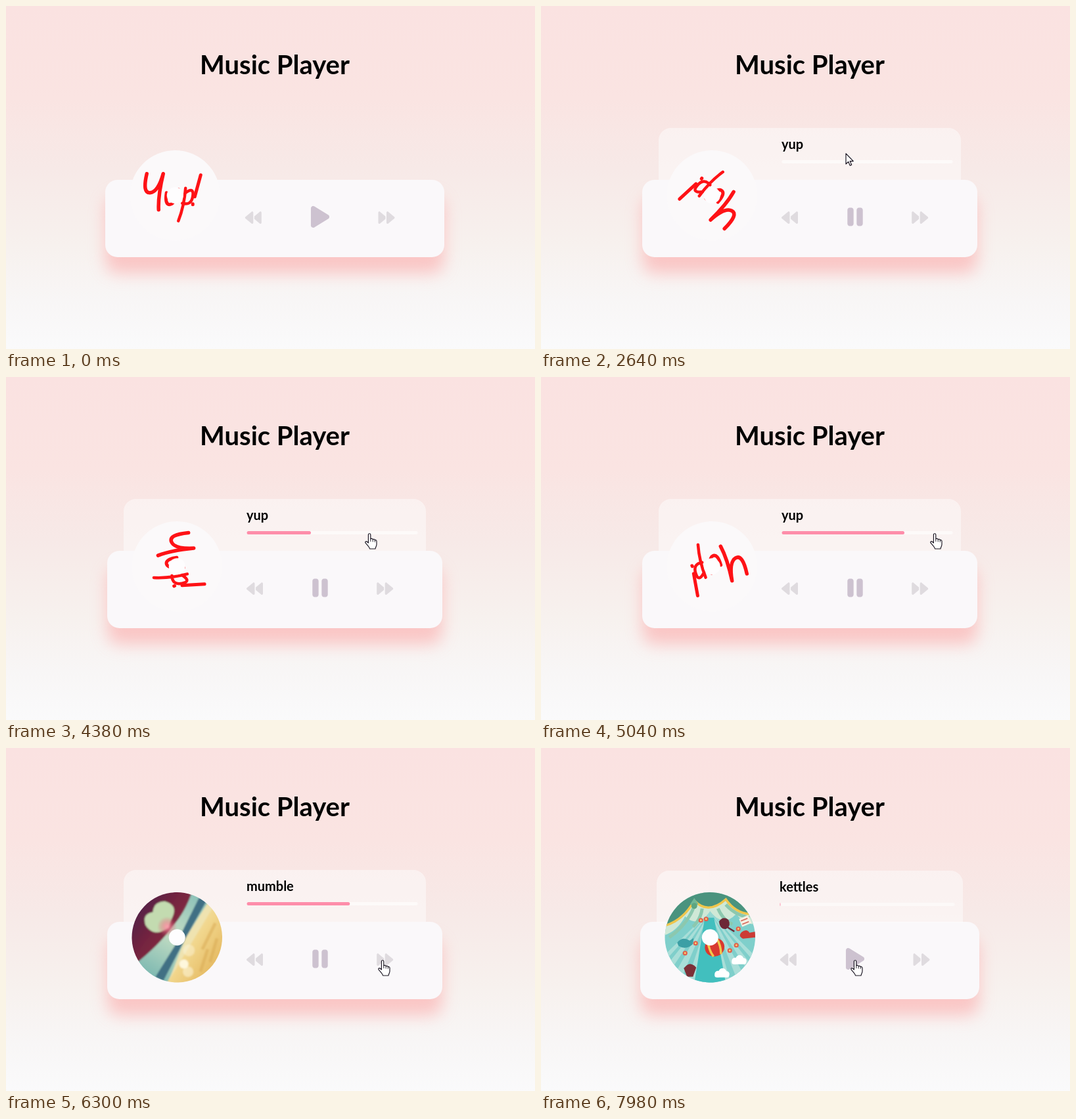
Write an HTML page that moves like this. It is 805 by 523 pixels and loops after 8000 ms.

```html
<!DOCTYPE html>
<html lang="en">
<head>
<meta charset="utf-8">
<title>Music Player</title>
<style>
  html, body { margin: 0; width: 100%; height: 100%; overflow: hidden; background: #fafafb; }
  svg { display: block; width: 805px; height: 523px; }
  text { font-family: Lato, sans-serif; font-weight: 700; fill: #000; }
</style>
</head>
<body>
<svg viewBox="0 0 805 523" xmlns="http://www.w3.org/2000/svg">
  <defs>
    <linearGradient id="sky" x2="0" y2="1">
      <stop offset="0" stop-color="#fae2e1"/>
      <stop offset=".27" stop-color="#fae4e2"/>
      <stop offset=".47" stop-color="#f7e9e7"/>
      <stop offset=".7" stop-color="#f7f1ee"/>
      <stop offset=".86" stop-color="#f8f6f6"/>
      <stop offset="1" stop-color="#fafafb"/>
    </linearGradient>
    <linearGradient id="sand" x1="0" y1=".8" x2=".6" y2=".3">
      <stop offset="0" stop-color="#e2b256"/>
      <stop offset=".5" stop-color="#f1d68c"/>
      <stop offset="1" stop-color="#f7f0cc"/>
    </linearGradient>
    <linearGradient id="dusk" x1="0" y1="1" x2="1" y2="0">
      <stop offset="0" stop-color="#a23a4c"/>
      <stop offset=".55" stop-color="#73243f"/>
      <stop offset="1" stop-color="#35204f"/>
    </linearGradient>
    <linearGradient id="sea" x2="1" y2="1">
      <stop offset="0" stop-color="#58a5a8"/>
      <stop offset=".5" stop-color="#c3ddc3"/>
      <stop offset="1" stop-color="#6fb3b3"/>
    </linearGradient>
    <radialGradient id="flare">
      <stop offset="0" stop-color="#ff9fae"/>
      <stop offset="1" stop-color="#e0506c" stop-opacity="0"/>
    </radialGradient>
    <filter id="blur" x="-20%" y="-60%" width="140%" height="220%">
      <feGaussianBlur stdDeviation="12.5"/>
    </filter>
    <filter id="soft"><feGaussianBlur stdDeviation="1"/></filter>
    <clipPath id="round"><circle r="68.75"/></clipPath>
    <path id="skip" d="M459.5 440.6c9.5 7.9 22.8 9.7 34.1 4.4s18.4-16.6 18.4-29V96c0-12.4-7.2-23.7-18.4-29s-24.5-3.6-34.1 4.4L288 214.3v83.4L459.5 440.6zM256 352V96c0-12.4-7.2-23.7-18.4-29s-24.5-3.6-34.1 4.4l-192 160C4.2 237.5 0 246.5 0 256s4.2 18.5 11.5 24.6l192 160c9.5 7.9 22.8 9.7 34.1 4.4s18.4-16.6 18.4-29V352z" transform="scale(.0488) translate(-256 -256)"/>
    <g id="cloud" fill="#fff"><circle r="5"/><circle cx="7" cy="-3" r="6"/><circle cx="13" cy="0" r="4.5"/><rect x="-5" y="-1" width="22" height="6" rx="3"/></g>
    <g id="flower"><circle r="3.6" fill="#e2604c"/><circle r="1.4" fill="#f7d774"/></g>
  </defs>

  <rect width="805" height="523" fill="url(#sky)"/>
  <text x="409" y="104" font-size="40" text-anchor="middle">Music Player</text>

  <rect id="shade" y="290" height="118" rx="18.75" fill="#fca9a9" opacity=".6" filter="url(#blur)"/>
  <rect id="box" y="265" height="118" rx="18.75" fill="#faf8fa"/>

  <g id="panel">
    <path id="back" fill="#fdfdfd" fill-opacity=".5"/>
    <text id="name" x="187" y="31.5" font-size="20"></text>
    <rect id="track" x="187.5" y="49" height="5" rx="2.5" fill="#fdfaf9"/>
    <rect id="bar" x="187.5" y="49" height="5" rx="2.5" fill="#fe8daa"/>
  </g>

  <g id="disc">
    <g id="spin" clip-path="url(#round)">
      <g class="art">
        <circle r="69" fill="#fbf9fa"/>
        <g fill="none" stroke="#fe1216" stroke-width="5" stroke-linecap="round" stroke-linejoin="round">
          <path d="M-43-33Q-50-3-38-4T-18-33Q-26 0-25 22" stroke-width="5.5"/>
          <path d="M-13-4Q-16 14-8 14T5-9"/>
          <path d="M16-11Q14 16 5 39M15-3Q29-14 27 1T11 12" stroke-width="4.5"/>
          <path d="M39-31L30 2M27 13v1"/>
        </g>
      </g>
      <g class="art" transform="rotate(-59)">
        <g filter="url(#soft)">
          <rect x="-75" y="-75" width="150" height="150" fill="url(#sand)"/>
          <path d="M-75-45L-20-80 80 30 55 75Z" fill="url(#sea)"/>
          <path d="M-58-38L-49-48-8-3 56 55 49 66 0 17Z" fill="#3f6f84"/>
          <path d="M-60-30L-5 12 46 68 36 72-15 18Z" fill="#efe3b0"/>
          <path d="M-23-75H80V52Q40 32 18-2-4-29-23-75Z" fill="url(#dusk)"/>
          <path d="M18-8Q8-34 31-41 49-42 47-25 62-20 58-3 47 15 32 2 25-4 18-8Z" fill="#c3dbb0"/>
          <circle cx="20" cy="-10" r="15" fill="url(#flare)"/>
          <circle cx="-42" cy="-1" r="7" fill="#fffbe6" opacity=".9"/>
          <circle cx="-24" cy="12" r="9" fill="#fffbe6" opacity=".4"/>
          <circle cx="-55" cy="2" r="8" fill="#fffbe6" opacity=".5"/>
          <path d="M-50 38L-18 58M-60 20L-30 40M-28 32L5 62" stroke="#d9a953" stroke-width="5" opacity=".5"/>
        </g>
      </g>
      <g class="art" transform="rotate(-161.5)">
        <rect x="-75" y="-75" width="150" height="150" fill="#7fcfcb"/>
        <path id="rays" fill="#a9ded8"/>
        <path d="M-8-30H6L24 70H-24Z" fill="#42bfbe"/>
        <path d="M-75-75H75V-20Q52-18 40-36 20-14 0-40-18-13-38-32-52-6-75-2Z" fill="#cfe8d6"/>
        <path d="M-24-48Q-34-20-62 0M-12-44Q-14-28-26-16M12-44Q20-26 34-20M24-50Q38-34 60-30" fill="none" stroke="#8cc8ae" stroke-width="5"/>
        <path d="M-75-75H75V-36Q42-30 24-58-3-34-24-56-40-22-75-16Z" fill="#4a937e"/>
        <path d="M-72-17Q-42-24-24-56-3-34 24-58 42-32 72-36" fill="none" stroke="#efc64c" stroke-width="3.5"/>
        <path d="M-30-51L-24-45-18-51-24-60ZM-29-49" fill="#70b795"/>
        <circle cx="-24" cy="-48" r="4.5" fill="#5da581"/>
        <g transform="translate(7 15) rotate(-18)">
          <ellipse rx="15" ry="14" fill="#d9392f"/>
          <path d="M-7-12Q-10 0-6 13M7-12Q10 0 6 13" fill="none" stroke="#f2c84b" stroke-width="3.5"/>
        </g>
        <path d="M-36 43q5-5 12 0l3 3-5 14h-9l-5-13Z" fill="#7c3038"/>
        <path d="M-50 8q8-10 19-3l6-4-1 9q-10 10-22 3Z" fill="#3c9fa5"/>
        <path d="M15-24q5-7 12-2 4 8-3 12-8 1-9-10ZM24-17l13 8" fill="#6d2836" stroke="#6d2836" stroke-width="2.5"/>
        <path d="M48-8q8-6 12 1l10-2v9l-20 2q-8-4-2-10Z" fill="#cc3b36"/>
        <path d="M44-28l14-6 5 12-14 6Z" fill="#f4efe2"/>
        <path d="M47-25l10-4M49-20l10-4" stroke="#d66558" stroke-width="1.5"/>
        <use href="#cloud" x="38" y="36"/>
        <use href="#cloud" x="12" y="56"/>
        <use href="#flower" x="-14" y="-26"/>
        <use href="#flower" x="-22" y="9"/>
        <use href="#flower" x="-38" y="24"/>
        <use href="#flower" x="40" y="12"/>
        <use href="#flower" x="43" y="-13"/>
        <use href="#flower" x="-6" y="-28"/>
        <use href="#flower" x="30" y="20"/>
      </g>
    </g>
    <circle r="12.5" fill="#fefdfe"/>
  </g>

  <g fill="#dfdbdf">
    <use id="prev" href="#skip"/>
    <use id="next" href="#skip"/>
  </g>
  <g fill="#cdc2d0" transform="translate(478 321.5) scale(.0732)">
    <path id="play" d="M73 39c-14.8-9.1-33.4-9.4-48.5-.9S0 62.6 0 80v352c0 17.4 9.4 33.4 24.5 41.9s33.7 8.1 48.5-.9l288-176c14.3-8.7 23-24.2 23-41s-8.7-32.2-23-41L73 39z" transform="translate(-192 -256)"/>
    <path id="pause" d="M48 64C21.5 64 0 85.5 0 112v288c0 26.5 21.5 48 48 48h32c26.5 0 48-21.5 48-48V112c0-26.5-21.5-48-48-48zm192 0c-26.5 0-48 21.5-48 48v288c0 26.5 21.5 48 48 48h32c26.5 0 48-21.5 48-48V112c0-26.5-21.5-48-48-48z" transform="translate(-160 -256)"/>
  </g>

  <g id="cursor" fill="#fff" stroke="#17121f" stroke-width="1.15" stroke-linejoin="round">
    <g id="hand" transform="translate(-7 0)">
      <path d="M5.4 2.4C5.4.2 8.8.2 8.8 2.4V9C9.5 7.9 12 8.2 12.2 9.8 13 8.8 15.1 9.2 15.3 10.8 16.3 10 18 10.6 18 12.5V17C18 20 16.4 21 16 24H7.5C7 21.5 4 18.5 1.2 15.2 0 13.4 1.8 11.9 3.3 13L5.4 15Z"/>
      <path d="M8.8 9v4M12.2 9.8v3.6M15.3 10.8v3" fill="none" stroke-width=".9"/>
    </g>
    <path id="arrow" d="M0 0V16L3.7 12.5 6.3 18.3 8.7 17.2 6.2 11.6H11.3Z"/>
  </g>
</svg>
<script>
const LOOP = 8000, TICK = 60, START = 957, STOP = 7953;
const $ = id => document.getElementById(id);
const set = (id, attrs) => { for (const k in attrs) $(id).setAttribute(k, attrs[k]); };
const show = (el, on) => el.setAttribute('visibility', on ? 'inherit' : 'hidden');
const clamp = x => Math.max(0, Math.min(1, x));
const mix = (a, b, k) => a + (b - a) * k;
const smooth = x => x * x * (3 - 2 * x);
const arts = document.querySelectorAll('.art');

const songs = [[0, 'yup'], [5880, 'mumble'], [7380, 'kettles']];
const path = [ // time, x, y
  [180, 749, 123], [780, 481, 318], [1800, 481, 318], [2580, 464, 225],
  [2640, 464, 225], [2760, 464, 234], [3480, 464, 234], [4050, 553, 238],
  [4380, 553, 238], [5040, 599, 238], [5220, 599, 238], [5700, 573, 323],
  [7680, 573, 323], [7980, 478, 323]
];
const seeks = [[2880, 97.5], [4440, 186.5], [5220, 234], [6267, 0]]; // time, width

$('rays').setAttribute('d', [...Array(9)].map((_, i) => {
  const a = i * 22 - 88;
  return `M0-40L${a * 1.3 - 10} 80H${a * 1.3 + 6}Z`;
}).join(''));

// CSS ease-in, solved by bisection
function easeIn(x) {
  let lo = 0, hi = 1;
  for (let i = 0; i < 20; i++) {
    const s = (lo + hi) / 2;
    if (1.26 * s * (1 - s) ** 2 + 3 * s * s * (1 - s) + s ** 3 < x) lo = s; else hi = s;
  }
  return lo * lo * (3 - 2 * lo);
}

function pointer(t) {
  let i = 0;
  while (i < path.length - 2 && path[i + 1][0] <= t) i++;
  const [t0, x0, y0] = path[i], [t1, x1, y1] = path[i + 1];
  const k = smooth(clamp((t - t0) / (t1 - t0)));
  return [mix(x0, x1, k), mix(y0, y1, k)];
}

function draw(t) {
  const on = t > START && t < STOP;
  const left = on ? 154 : 151, width = on ? 510 : 516;
  const lift = t < STOP ? easeIn(clamp((t - START) / 300)) : 1 - easeIn(clamp((t - STOP) / 300));

  set('box', { x: left, width });
  set('shade', { x: left, width });

  const w = width - 50;
  set('panel', { transform: `translate(${left + 25} ${265 - 79 * lift})`, opacity: lift });
  set('back', { d: `M0 79V18.75A18.75 18.75 0 0 1 18.75 0H${w - 18.75}A18.75 18.75 0 0 1 ${w} 18.75V79Z` });
  set('track', { width: w - 200 });
  const fill = seeks.reduce((v, [at, to]) => mix(v, to, clamp((t - at) / 100)), 0);
  set('bar', { width: Math.max(on && t < 2880 ? 0 : 1, fill) });

  const n = songs.filter(s => s[0] <= t).length - 1;
  $('name').textContent = songs[n][1];
  arts.forEach((el, i) => show(el, i === n));
  const turn = t > START ? .126 * (Math.min(t, STOP) - START) : 0;
  set('disc', { transform: `translate(${left + 106.25} 288.75)` });
  set('spin', { transform: `rotate(${turn})` });

  set('prev', { transform: `translate(${on ? 378.5 : 376.3} 322.7)` });
  set('next', { transform: `translate(${on ? 576.7 : 579} 322.7) scale(-1 1)` });
  show($('play'), !on);
  show($('pause'), on);

  const [x, y] = pointer(t);
  const inButton = y > 290 && y < 355 && [377, 478, 578].some(c => Math.abs(x - c) < 26);
  const inBar = on && x > 366 && x < 627 && y > 231 && y < 243;
  show($('cursor'), t >= 180);
  show($('hand'), inButton || inBar);
  show($('arrow'), !(inButton || inBar));
  set('cursor', { transform: `translate(${Math.round(x)} ${Math.round(y)})` });
}

function frame(now) {
  draw(Math.floor(now % LOOP / TICK) * TICK);
  requestAnimationFrame(frame);
}
draw(0);
requestAnimationFrame(frame);
</script>
</body>
</html>
```
